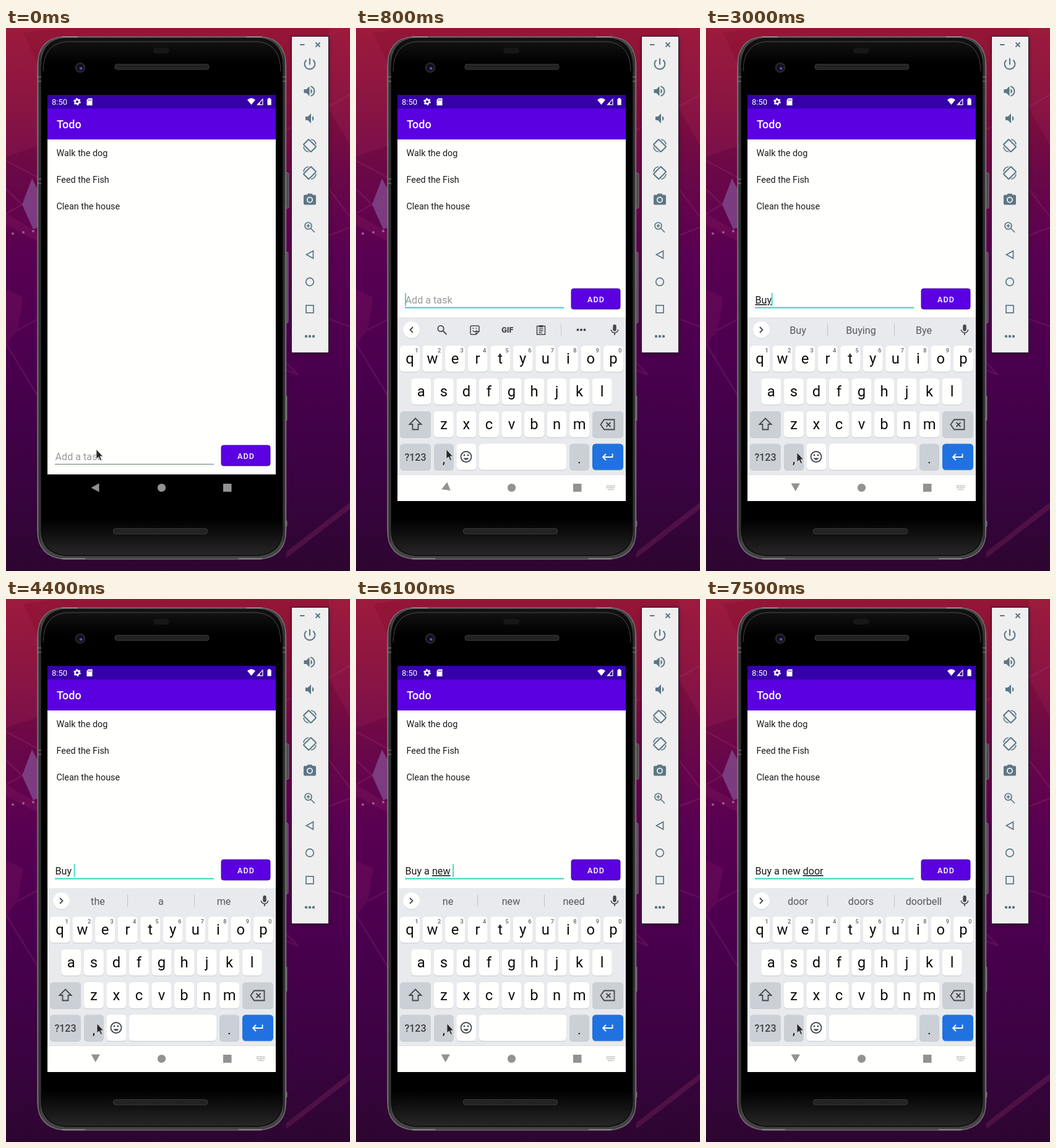
Recreate the animation shown at these times as an HTML page. Size 556x877 px, loop 8000 ms.

```html
<!DOCTYPE html>
<html lang="en">
<head>
<meta charset="utf-8">
<title>Todo</title>
<style>
  html, body { margin: 0; width: 100%; height: 100%; overflow: hidden; background: #4a004c; }
  svg { display: block; }
  text { font-family: Roboto, "Noto Sans", sans-serif; white-space: pre; }
  .mid { text-anchor: middle; }
  .med { font-weight: 500; }
  .field { font-size: 16.16px; }
  .item { font-size: 14.37px; fill: #1c1c1c; }
  .letter { font-size: 23.8px; fill: #0c0c0c; }
  .digit { font-size: 9.2px; fill: #5f6368; font-weight: 500; }
  .word { font-size: 16.16px; fill: #55595e; }
  .line { fill: none; stroke: #44484c; stroke-width: 1.8; }
  .thin { stroke-width: 1.5; }
  .tool { fill: none; stroke: #5b7785; stroke-width: 2; }
  .solid { fill: #5b7785; }
  .white { fill: #fffffe; }
</style>
</head>
<body>
<svg width="556" height="877" viewBox="0 0 556 877">
  <defs>
    <linearGradient id="sky" x1="0" y1="0" x2="0" y2="1">
      <stop offset="0" stop-color="#951636"/>
      <stop offset=".12" stop-color="#84103a"/>
      <stop offset=".27" stop-color="#6a0848"/>
      <stop offset=".42" stop-color="#590052"/>
      <stop offset=".62" stop-color="#4a004e"/>
      <stop offset=".85" stop-color="#390340"/>
      <stop offset="1" stop-color="#2d0630"/>
    </linearGradient>
    <linearGradient id="metal">
      <stop offset="0" stop-color="#6a6a6a"/>
      <stop offset=".007" stop-color="#2a2a2a"/>
      <stop offset=".016" stop-color="#444"/>
      <stop offset=".984" stop-color="#444"/>
      <stop offset=".993" stop-color="#2a2a2a"/>
      <stop offset="1" stop-color="#6a6a6a"/>
    </linearGradient>
    <linearGradient id="glass" x1="0" y1="0" x2="0" y2="1">
      <stop offset="0" stop-color="#141414"/>
      <stop offset=".05" stop-color="#000"/>
      <stop offset=".93" stop-color="#000"/>
      <stop offset="1" stop-color="#272727"/>
    </linearGradient>
    <pattern id="mesh" width="3" height="3" patternUnits="userSpaceOnUse">
      <rect width="3" height="3" fill="#1c1c1c"/><circle cx="1" cy="1" r=".8" fill="#3c3c3c"/>
    </pattern>
    <filter id="soft" x="-20%" y="-10%" width="140%" height="120%"><feGaussianBlur stdDeviation="3"/></filter>
    <clipPath id="view"><rect x="67" y="108" width="369" height="656"/></clipPath>
  </defs>

  <!-- wallpaper -->
  <rect width="556" height="877" fill="url(#sky)"/>
  <g fill="#e0558a" fill-opacity=".09">
    <path d="M28 8L80 0H0V208L52 190V60Z"/>
    <path d="M522 0H556V190L522 130Z"/>
    <path d="M0 422L28 435L19 488L0 512Z"/>
    <path d="M0 300L52 330V345L0 318Z"/>
    <path d="M556 766L453 846V856L556 777Z" fill-opacity=".16"/>
  </g>
  <path d="M42 243L52 262V322L44 325L26 285Z" fill="#8c62a4" fill-opacity=".6"/>
  <g fill="none" stroke="#c04a8c" stroke-opacity=".18" stroke-width="2.5">
    <path d="M0 214L52 242M0 260L26 285L0 300M19 488L52 470M0 510L52 595"/>
    <path d="M452 165L556 108M522 260L556 305M522 335L556 322M452 540L472 560L452 552M522 470L556 482"/>
  </g>
  <g fill="#a05a98"><circle cx="11" cy="332" r="2"/><circle cx="28" cy="330" r="2"/><circle cx="44" cy="328" r="2"/></g>

  <!-- phone -->
  <g fill="#4c4c4c" stroke="#8a8a8a" stroke-width=".8">
    <rect x="451" y="234" width="6" height="57" rx="1.5"/>
    <rect x="450" y="362" width="6" height="114" rx="1.5"/>
    <rect x="450" y="594" width="4" height="40" rx="1"/>
    <rect x="450" y="796" width="4" height="9" rx="1"/>
  </g>
  <path d="M92 14H412Q452.500 17 452.500 62V812Q452.500 854 410 858H94Q51 854 51 812V62Q51 17 92 14Z" fill="url(#metal)" stroke="#808080" stroke-width="1.2"/>
  <path d="M94 17H410Q447 20 447 64V810Q447 848 408 852H96Q57 848 57 810V64Q57 20 94 17Z" fill="url(#glass)" stroke="#0a0a0a" stroke-width="1.4"/>
  <path d="M60 70Q60 25 98 22H406Q444 25 444 70" fill="none" stroke="#777" stroke-opacity=".6"/>
  <path d="M90 14.5H116M388 14.5H414M90 857H128M376 857H414" stroke="#aaa" stroke-width="1.2"/>
  <path d="M51 79H57M51 86H57M447 79H453M447 86H453M51 244H57M51 251H57" stroke="#999" stroke-width=".8"/>
  <rect x="238" y="32" width="26" height="9" rx="4.5" fill="#171717"/>
  <g fill="url(#mesh)" stroke="#474747" stroke-width=".8">
    <rect x="176" y="58.5" width="152" height="8.5" rx="3.5"/>
    <rect x="173.5" y="808.5" width="152" height="8.5" rx="3.5"/>
  </g>
  <circle cx="120" cy="64" r="8.5" fill="#242426"/>
  <circle cx="120" cy="64" r="5.5" fill="#0c0c1c"/>
  <circle cx="121" cy="65" r="2.8" fill="#35307a"/>
  <circle cx="121.5" cy="65.5" r="1" fill="#9a90d8"/>

  <!-- screen -->
  <g clip-path="url(#view)">
    <rect x="67" y="108" width="369" height="656"/>
    <rect x="67" y="108" width="369" height="613" class="white"/>
    <rect x="67" y="108" width="369" height="22" fill="#3500a9"/>
    <rect x="67" y="130" width="369" height="50" fill="#5b00e1"/>
    <g fill="#fff">
      <text x="74" y="124" font-size="13">8:50</text>
      <g fill="none" stroke="#fff">
        <circle cx="115" cy="119" r="3.3" stroke-width="2.4"/>
        <circle cx="115" cy="119" r="5" stroke-width="1.8" stroke-dasharray="2.62"/>
      </g>
      <path fill-rule="evenodd" d="M133 113.500H139.500V125H130.500V116ZM133 115.500V117.500H134V115.500ZM135 115.500V117.500H136V115.500ZM137 115.500V117.500H138V115.500Z"/>
      <path d="M390 116Q396.500 110.500 403 116L396.500 124Z"/>
      <path fill-rule="evenodd" d="M405 124.500L415.500 113.500V124.500ZM410.500 120.500V123.300H414.300V116.500Z"/>
      <path d="M422.500 114.500H424V113H427V114.500H428.700V124.500H422.500Z"/>
      <text x="82" y="161.5" font-size="17.96" class="med">Todo</text>
    </g>
    <g class="item">
      <text x="81.5" y="207">Walk the dog</text>
      <text x="81.5" y="250">Feed the Fish</text>
      <text x="81.5" y="293">Clean the house</text>
    </g>

    <g id="bar">
      <text id="hint" class="field" x="79.5" y="698" fill="#999">Add a task</text>
      <text id="typed" class="field" x="79.5" y="698" fill="#1a1a1a"><tspan></tspan><tspan text-decoration="underline"></tspan><tspan></tspan></text>
      <rect id="rule" x="79" width="257"/>
      <rect id="caret" y="681" width="2" height="21" fill="#45dccb"/>
      <rect x="348" y="674" width="79" height="33" rx="3.6" fill="#5b00e1" stroke="#3d0a9c"/>
      <text x="374" y="695.5" font-size="12.57" letter-spacing="1.12" class="med" fill="#fff">ADD</text>
    </g>

    <g id="board">
      <rect x="67" y="467" width="369" height="255" fill="#e8eaed"/>
      <rect x="67" y="722" width="369" height="42" class="white"/>
      <path d="M67 721.500H436" stroke="#dcdee1"/>
      <circle cx="89.5" cy="488.3" r="13.6" fill="#c9ccd0"/>
      <circle cx="89.5" cy="487.5" r="13.5" class="white"/>
      <path id="chevron" class="line"/>
      <g id="tools">
        <circle cx="137" cy="485.5" r="4.7" class="line"/>
        <path d="M140.500 489L146.500 495" class="line"/>
        <path d="M187 481H197Q199 481 199 483V490L194 495H187Q185 495 185 493V483Q185 481 187 481ZM199 490H194V495M188.500 488.500Q192 492.500 195.500 488.500M188.500 485H190.500M193.500 485H195.500" class="line thin"/>
        <text x="244.7" y="492" font-size="12.5" font-weight="900" class="mid" fill="#44484c">GIF</text>
        <path d="M292.500 481.500H305.500V495H292.500ZM295.500 486H302.500M295.500 489H302.500M295.500 492H300.500" class="line thin"/>
        <path d="M295.500 480H302.500V483.500H295.500Z" fill="#44484c"/>
        <path d="M331.500 477.500V497.500" stroke="#c8cbcf"/>
        <g fill="#44484c"><circle cx="358.5" cy="487.5" r="2"/><circle cx="364" cy="487.5" r="2"/><circle cx="369.5" cy="487.5" r="2"/></g>
      </g>
      <g id="words">
        <path d="M196.500 477.500V497.500M304.500 477.500V497.500" stroke="#bfc3c8"/>
        <text class="word mid" x="148.5" y="494"></text>
        <text class="word mid" x="250.5" y="494"></text>
        <text class="word mid" x="352" y="494"></text>
      </g>
      <path transform="translate(407.2 477) scale(.9)" fill="#44484c" d="M12 14c1.660 0 2.990-1.340 2.990-3L15 5c0-1.660-1.340-3-3-3S9 3.340 9 5v6c0 1.660 1.340 3 3 3zm5.300-3c0 3-2.540 5.100-5.300 5.100S6.700 14 6.700 11H5c0 3.410 2.720 6.230 6 6.720V21h2v-3.280c3.280-.48 6-3.300 6-6.720h-1.700z"/>
      <g id="keys"></g>
      <path d="M96 630.500L105.500 640H100.500V648.500H91.500V640H86.500Z" class="line"/>
      <path d="M401 632.500H417.500V648.500H401L395.500 640.500ZM404.500 637L411.500 644M411.500 637L404.500 644" class="line"/>
      <circle cx="178" cy="692.5" r="8.5" class="line"/>
      <path d="M173.500 694.500Q178 701 182.500 694.500Z" fill="#44484c"/>
      <circle cx="175" cy="690" r="1.4" fill="#44484c"/><circle cx="181" cy="690" r="1.4" fill="#44484c"/>
      <path d="M414.500 687.500V693H399.500M404 688L399 693L404 698" fill="none" stroke="#fff" stroke-width="1.8"/>
      <text x="96" y="698.5" font-size="16" class="mid med" fill="#3c4043">?123</text>
      <text x="142" y="703" font-size="20" class="mid">,</text>
      <text x="361" y="703" font-size="20" class="mid">.</text>
    </g>

    <g fill="#929292">
      <path id="back" d="M-7 0L5.800-7.200V7.200Z"/>
      <circle cx="251.5" cy="742.5" r="6.6"/>
      <rect x="351" y="736" width="13.5" height="13"/>
      <path id="dots" d="M405 739.500H418.500M405 742.500H418.500M407.500 745.500H416" stroke="#9a9a9a" stroke-width="1.5" stroke-dasharray="1.5 1"/>
    </g>
  </g>

  <!-- emulator controls -->
  <rect x="462" y="16" width="60" height="510" opacity=".4" filter="url(#soft)"/>
  <rect x="461.5" y="13.5" width="60" height="511" fill="#efefef" stroke="#28102a"/>
  <path d="M475 27H482.500M500.500 23.500L507.500 30.500M507.500 23.500L500.500 30.500" class="tool thin"/>
  <g class="solid">
    <path transform="translate(478.4 45.5) scale(1.05)" d="M13 3h-2v10h2V3zm4.830 2.170l-1.420 1.420A6.920 6.920 0 0 1 19 12c0 3.870-3.130 7-7 7A6.995 6.995 0 0 1 7.580 6.580L6.170 5.170A8.932 8.932 0 0 0 3 12a9 9 0 0 0 18 0c0-2.740-1.230-5.180-3.170-6.830z"/>
    <path transform="translate(478.5 90)" d="M3 9v6h4l5 5V4L7 9H3zm13.500 3c0-1.770-1.020-3.290-2.500-4.030v8.050c1.480-.73 2.500-2.250 2.500-4.020zM14 3.230v2.060c2.890.86 5 3.540 5 6.710s-2.110 5.850-5 6.710v2.060c4.010-.91 7-4.490 7-8.770s-2.990-7.860-7-8.770z"/>
    <path transform="translate(479 134)" d="M18.500 12A4.500 4.500 0 0 0 16 7.970v8.050c1.480-.73 2.500-2.250 2.500-4.020zM5 9v6h4l5 5V4L9 9H5z"/>
    <path fill-rule="evenodd" transform="translate(479 265.5)" d="M9 2L7.170 4H4c-1.100 0-2 .9-2 2v12c0 1.100.9 2 2 2h16c1.100 0 2-.9 2-2V6c0-1.100-.9-2-2-2h-3.170L15 2H9zm3 15c-2.760 0-5-2.240-5-5s2.240-5 5-5 5 2.240 5 5-2.240 5-5 5z"/>
    <circle cx="491" cy="277.5" r="3.2"/>
    <circle cx="485" cy="498" r="2.2"/><circle cx="491" cy="498" r="2.2"/><circle cx="497" cy="498" r="2.2"/>
  </g>
  <g class="tool">
    <g id="turn" transform="translate(491 190)">
      <rect x="-6" y="-8.5" width="12" height="17" rx="1" transform="rotate(-45)"/>
      <path d="M2-10Q9-9 10-2M-2 10Q-9 9-10 2" stroke-width="1.7"/>
    </g>
    <use href="#turn" transform="translate(982 44) scale(-1 1)"/>
    <g stroke-width="1.7">
      <circle cx="488.5" cy="319.5" r="5.5"/>
      <path d="M492.500 323.500L499 330M485.500 319.500H491.500M488.500 316.500V322.500"/>
      <path d="M485.500 366L496.500 360V372Z"/>
      <circle cx="491" cy="410" r="6.3"/>
      <rect x="485" y="448" width="12" height="12"/>
    </g>
  </g>

  <path id="mouse" d="M0 0V15.500L3.600 12.300L6.200 18L8.600 17L6.100 11.400H10.500Z" fill="#262626" stroke="#e8e8e8" stroke-width=".8"/>
</svg>
<script>
  const $ = id => document.getElementById(id);
  const NS = 'http://www.w3.org/2000/svg';
  const LOOP = 8000, STEP = 100, PITCH = 36.55;
  const DARK = '#cbd0d6';

  function add(tag, attrs, label = '') {
    const el = document.createElementNS(NS, tag);
    for (const name in attrs) el.setAttribute(name, attrs[name]);
    el.textContent = label;
    $('keys').append(el);
  }

  function key(x, y, w, fill = '#fffffe') {
    add('rect', { x, y: y + 1, width: w, height: 42.3, rx: 5.5, fill: '#c3c6ca' });
    add('rect', { x, y, width: w, height: 42.3, rx: 5.5, fill });
  }

  function row(letters, x, y, digits) {
    [...letters].forEach((c, i) => {
      const left = x + i * PITCH;
      key(left, y, 32);
      add('text', { x: left + 16, y: y + 29, class: 'letter mid' }, c);
      if (digits) add('text', { x: left + 27, y: y + 10.5, class: 'digit mid' }, (i + 1) % 10);
    });
  }

  row('qwertyuiop', 71, 513, true);
  row('asdfghjkl', 89.3, 566);
  row('zxcvbnm', 125.8, 619);
  key(71, 619, 50, DARK);
  key(382, 619, 50, DARK);
  key(71, 671.5, 50, DARK);
  key(126, 671.5, 32, DARK);
  key(162.4, 671.5, 32);
  key(199, 671.5, 141);
  key(345, 671.5, 32, DARK);
  key(382, 671.5, 50, '#2072e0');

  // time, typed text, underlined word, caret shown, suggestions
  const states = [
    [0, '', '', 0, ''],
    [500, '', '', 1, ''],
    [1600, '', '', 0, ''],
    [2100, 'B', '', 1, ''],
    [2300, 'B', 'B', 1, ''],
    [2400, 'B', 'B', 1, 'B But By'],
    [2600, 'Buy', 'B', 1, 'B But By'],
    [2700, 'Buy', 'Bu', 1, 'Bu But Buy'],
    [2900, 'Buy', 'Buy', 1, 'Buy Buying Bye'],
    [3200, 'Buy ', 'Buy', 1, 'Buy Buying Bye'],
    [3500, 'Buy ', '', 1, 'the a me'],
    [3900, 'Buy ', '', 0, 'the a me'],
    [4400, 'Buy ', '', 1, 'the a me'],
    [4900, 'Buy ', '', 0, 'the a me'],
    [5500, 'Buy a', 'a', 1, 'the a me'],
    [5600, 'Buy a ', 'a', 1, 'a and an'],
    [5700, 'Buy a n', '', 1, 'new few lot'],
    [5900, 'Buy a ne', 'n', 1, 'n new nice'],
    [6100, 'Buy a new ', 'new', 1, 'ne new need'],
    [6300, 'Buy a new ', '', 1, 'one car house'],
    [6400, 'Buy a new d', '', 1, 'one car house'],
    [6600, 'Buy a new do', 'd', 1, 'd day dog'],
    [6800, 'Buy a new door', 'do', 1, 'do dog door'],
    [7000, 'Buy a new door', 'door', 1, 'door doors doorbell'],
    [7500, 'Buy a new door', 'door', 0, 'door doors doorbell']
  ];

  const spans = $('typed').children;
  const words = $('words').querySelectorAll('text');
  const show = (id, on) => $(id).setAttribute('visibility', on ? 'visible' : 'hidden');
  const move = (id, x, y, more = '') => $(id).setAttribute('transform', `translate(${x} ${y}) ${more}`);

  function draw(t) {
    const [, text, mark, caret, tips] = states.findLast(s => s[0] <= t);
    const cut = mark ? text.lastIndexOf(mark) : text.length;
    spans[0].textContent = text.slice(0, cut);
    spans[1].textContent = mark;
    spans[2].textContent = text.slice(cut + mark.length);
    $('caret').setAttribute('x', 79 + (text ? $('typed').getComputedTextLength() : 0));
    show('caret', caret);
    show('hint', !text);

    const focus = t >= 400;
    $('rule').setAttribute('y', focus ? 703.6 : 704);
    $('rule').setAttribute('height', focus ? 2.2 : 1);
    $('rule').setAttribute('fill', focus ? '#3bd9c8' : '#5f7a74');
    move('bar', 0, t < 600 ? 0 : -253);

    show('tools', !tips);
    show('words', tips);
    tips.split(' ').forEach((w, i) => words[i].textContent = w);
    $('chevron').setAttribute('d', tips ? 'M87 483L91.5 487.5L87 492' : 'M92 483L87.5 487.5L92 492');

    const up = t >= 800;
    move('board', 0, up ? 0 : t >= 700 ? 167 : 240);
    $('board').setAttribute('opacity', up ? 1 : t >= 700 ? .37 : t >= 600 ? .1 : 0);
    show('dots', t >= 700);
    const turn = t < 800 ? 0 : t < 900 ? -22 : t < 1000 ? -68 : -90;
    move('back', 144.7, turn === -90 ? 741.3 : 742.4, `rotate(${turn})`);
    move('mouse', t < 1300 ? 146 : 147, t < 1200 ? 680.5 : t < 1300 ? 683 : 685.5);
  }

  let last = -1;
  function tick() {
    const t = Math.floor(performance.now() % LOOP / STEP) * STEP;
    if (t !== last) draw(last = t);
    requestAnimationFrame(tick);
  }
  tick();
</script>
</body>
</html>
```
